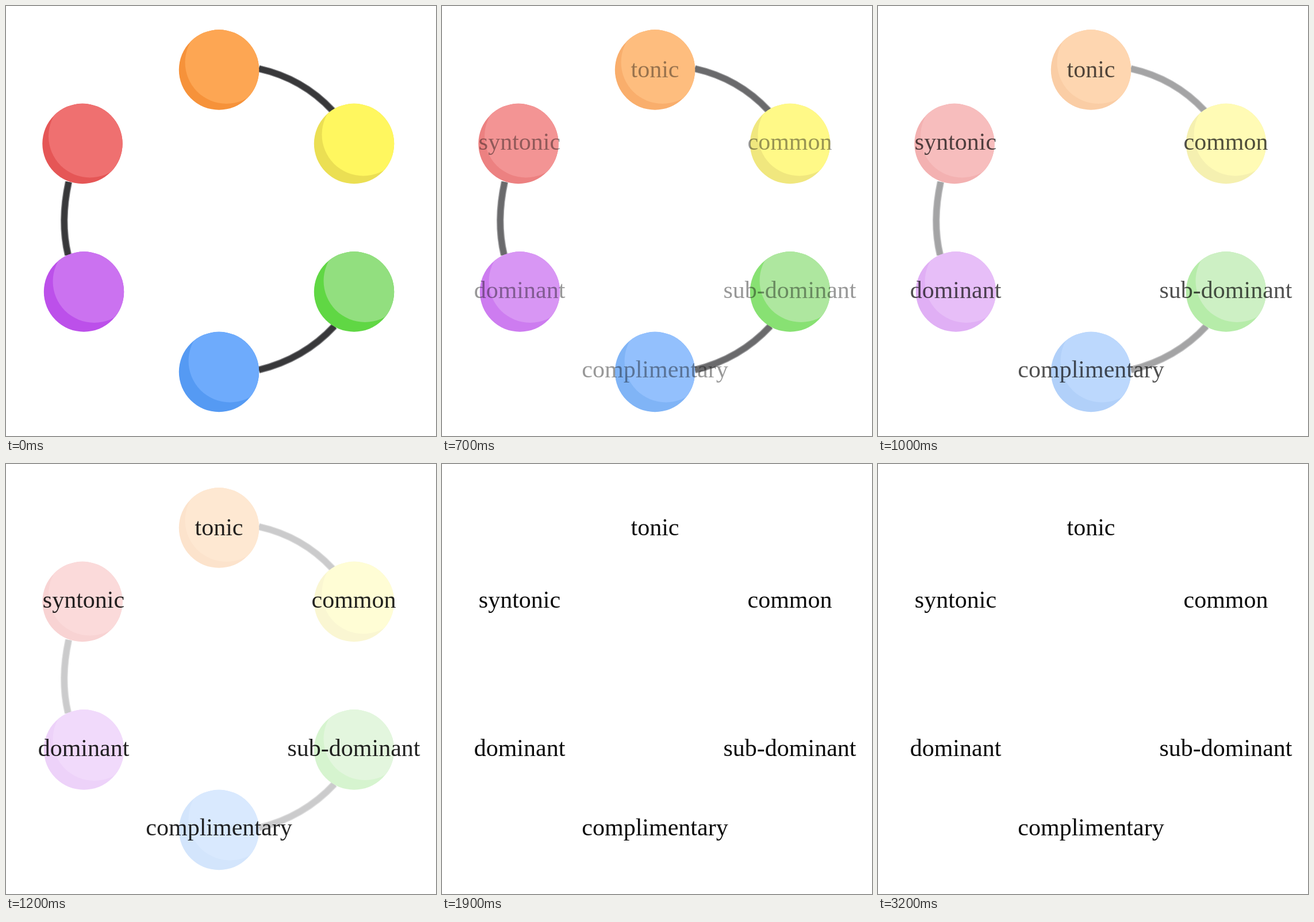
These frames come from a looping animation (748 px wide and 748 px high, 3300 ms). An HTML page with a canvas:

```html
<!DOCTYPE html>
<html lang="en">
<head>
<meta charset="utf-8">
<title>Colour circle</title>
<style>
  html, body { margin: 0; width: 100%; height: 100%; overflow: hidden; background: #fff; }
  canvas { display: block; }
</style>
</head>
<body>
<canvas id="stage" width="748" height="748"></canvas>
<script>
const ctx = document.getElementById('stage').getContext('2d');
const LOOP = 3300, STEP = 100, RADIUS = 69.7;

// x, y, face, shade, inset of the lit face, label, label x, baseline
const balls = [
  [370.5, 111, '#fda653', '#f6923a', 59, 'tonic', 370.5, 124],
  [605.5, 239.5, '#fff75f', '#ebdf53', 56, 'common', 605, 250],
  [605.5, 497, '#92df7f', '#60d744', 53, 'sub-dominant', 605, 508],
  [370.5, 636.5, '#6eabfc', '#559af3', 53, 'complimentary', 370.5, 646],
  [135.5, 497, '#cb72f0', '#bc50ea', 54, 'dominant', 135, 508],
  [133, 239.5, '#ef7070', '#e55656', 59, 'syntonic', 135, 250]
];
const links = [
  'M440 109Q516 126 568 182',
  'M440 633Q518 614 571 557',
  'M109 306Q94 375 108 433'
].map(d => new Path2D(d));

const shapeFade = [[400, 1], [500, 0.93], [800, 0.66], [1200, 0.26], [1400, 0]];
const textFade = [[300, 0], [500, 0.2], [800, 0.53], [1200, 0.9], [1400, 1]];

function valueAt(keys, t) {
  if (t <= keys[0][0]) return keys[0][1];
  for (let i = 1; i < keys.length; i++) {
    const [t0, v0] = keys[i - 1], [t1, v1] = keys[i];
    if (t <= t1) return v0 + (v1 - v0) * (t - t0) / (t1 - t0);
  }
  return keys[keys.length - 1][1];
}

function disc(x, y, r, color) {
  ctx.beginPath();
  ctx.arc(x, y, r, 0, 2 * Math.PI);
  ctx.fillStyle = color;
  ctx.fill();
}

function drawLink(path) {
  for (const [width, color] of [[12.5, '#77777a'], [9.5, '#38383a']]) {
    ctx.lineWidth = width;
    ctx.strokeStyle = color;
    ctx.stroke(path);
  }
}

function drawBall([x, y, face, shade, inset]) {
  const lit = 72, shift = lit - inset;
  disc(x, y, RADIUS, shade);
  ctx.save();
  ctx.clip();
  disc(x + shift, y - shift, lit, face);
  ctx.restore();
}

function draw(t) {
  ctx.fillStyle = '#fff';
  ctx.fillRect(0, 0, 748, 748);
  links.forEach(drawLink);
  balls.forEach(drawBall);

  // A white veil fades the whole group evenly.
  ctx.globalAlpha = 1 - valueAt(shapeFade, t);
  ctx.fillStyle = '#fff';
  ctx.fillRect(0, 0, 748, 748);

  ctx.globalAlpha = valueAt(textFade, t);
  ctx.fillStyle = '#0a0a0a';
  ctx.font = '42px "Liberation Serif", "Times New Roman", serif';
  ctx.textAlign = 'center';
  for (const ball of balls) ctx.fillText(...ball.slice(5));
  ctx.globalAlpha = 1;
}

const start = performance.now();
function tick() {
  const t = (performance.now() - start) % LOOP;
  draw(Math.floor(t / STEP) * STEP);
  requestAnimationFrame(tick);
}
tick();
</script>
</body>
</html>
```
